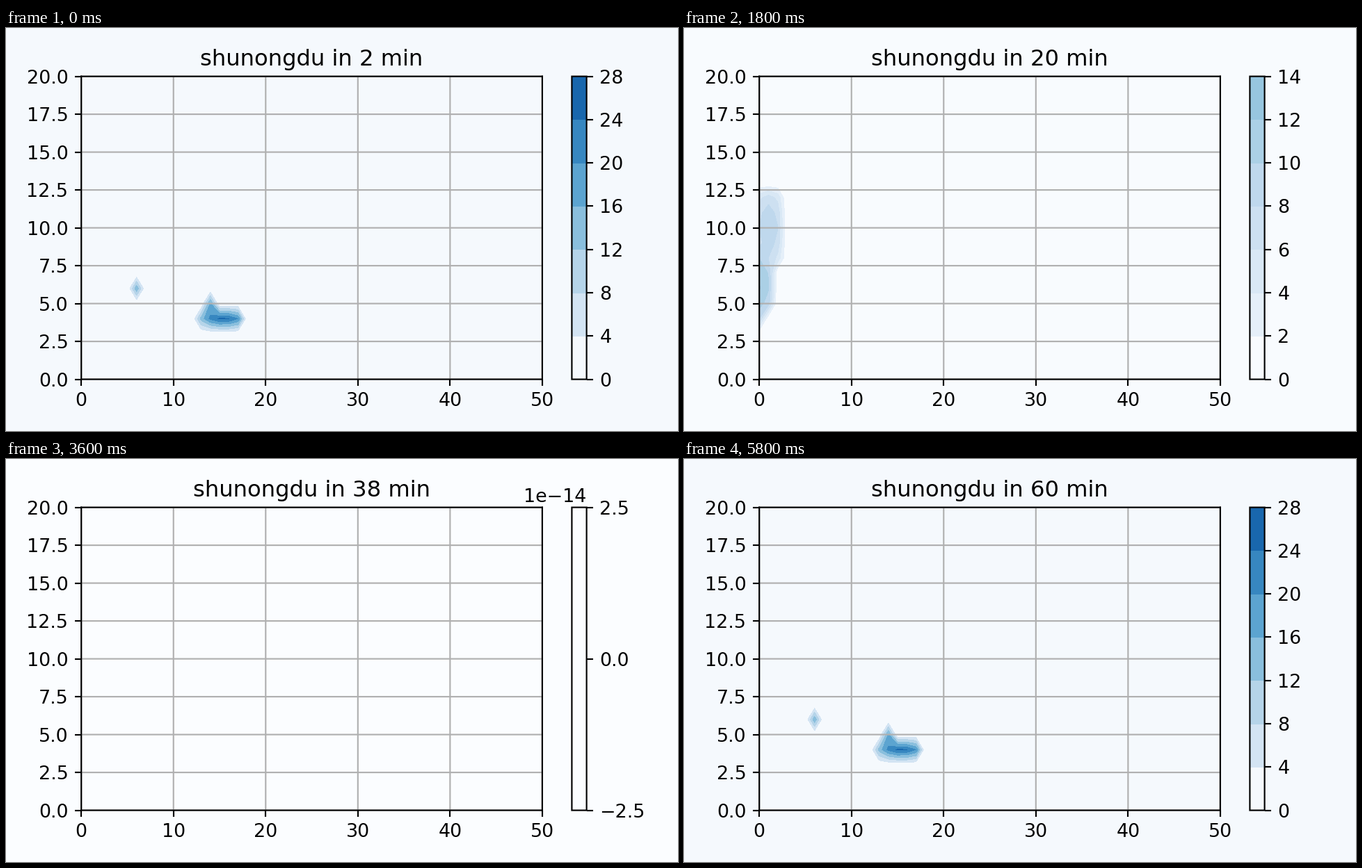
Write a matplotlib script that moves like this. It is 966 px wide and 580 px high and loops after 6 s.

```python
import numpy as np
import matplotlib.pyplot as plt
from matplotlib.animation import FuncAnimation
from matplotlib.colors import ListedColormap

W, H, DPI = 966, 580, 193.2
FRAMES, INTERVAL = 30, 200
PERIOD = 58          # minutes until the weather repeats
GROUND = 4           # nothing is seen below this row
DRIFT = 0.9          # columns per minute
VMAX = 33

plt.rcParams["path.snap"] = False

# Blues with its palest end halfway to white
shades = plt.get_cmap("Blues")(np.linspace(0, 1, 256))
shades[:20] = (shades[:20] + 1) / 2
CMAP = ListedColormap(shades)

Y, X = np.mgrid[0:21, 0:51]


def cell(minute, at, span, x, y, rx, ry, peak, slope=0, speed=0):
    """Elliptic dome that is fullest at minute `at` and drifts sideways."""
    age = (minute - at + PERIOD / 2) % PERIOD - PERIOD / 2
    gain = max(0, 1 - abs(age) / span)
    dx = X - x - round(speed * age)
    dy = Y - y - slope * dx
    d2 = (dx / rx) ** 2 + (dy / ry) ** 2
    return np.where((d2 < 1) & (Y >= GROUND), gain * peak * (1 - d2 / 2), 0)


def density(minute):
    return np.max([
        cell(minute, 2, 8, 15.4, 4, 2.5, 0.9, 25, speed=DRIFT),
        cell(minute, 2, 8, 14, 5, 0.9, 0.9, 16.5, speed=DRIFT),
        cell(minute, 2, 8, 6, 6, 0.9, 0.9, 15),
        cell(minute, 14, 4, 0, 4.9, 1.2, 1.3, 29.3),
        cell(minute, 26, 12, 0, 6.3, 1.75, 2.77, 24.5),
        cell(minute, 26, 12, 1, 10, 1.7, 2.7, 19.5),
        cell(minute, 46, 6, 7, 4, 0.9, 0.9, 15, speed=2 * DRIFT),
        cell(minute, 52, 6, 8.5, 4.5, 3, 1.6, 29.5, slope=-0.45, speed=DRIFT),
    ], axis=0)


def add_axes(x0, x1, top=69.6, bottom=505.6):
    return fig.add_axes([x0 / W, 1 - bottom / H, (x1 - x0) / W, (bottom - top) / H])


def draw(i):
    minute = 2 + 2 * i
    fig.clear()
    ax = add_axes(108.2, 770.9)
    cs = ax.contourf(density(minute), cmap=CMAP, vmin=0, vmax=VMAX)
    fig.set_facecolor(CMAP(cs.norm(cs.layers[0])))
    ax.set(xlim=(0, 50), ylim=(0, 20), yticks=np.arange(0, 20.1, 2.5))
    ax.set_title(f"shunongdu in {minute} min")
    ax.grid(True)
    fig.colorbar(cs, cax=add_axes(813.4, 834.6))


fig = plt.figure(figsize=(W / DPI, H / DPI), dpi=DPI)
anim = FuncAnimation(fig, draw, frames=FRAMES, init_func=lambda: draw(0),
                     interval=INTERVAL, repeat=True, cache_frame_data=False)
plt.show()
```
